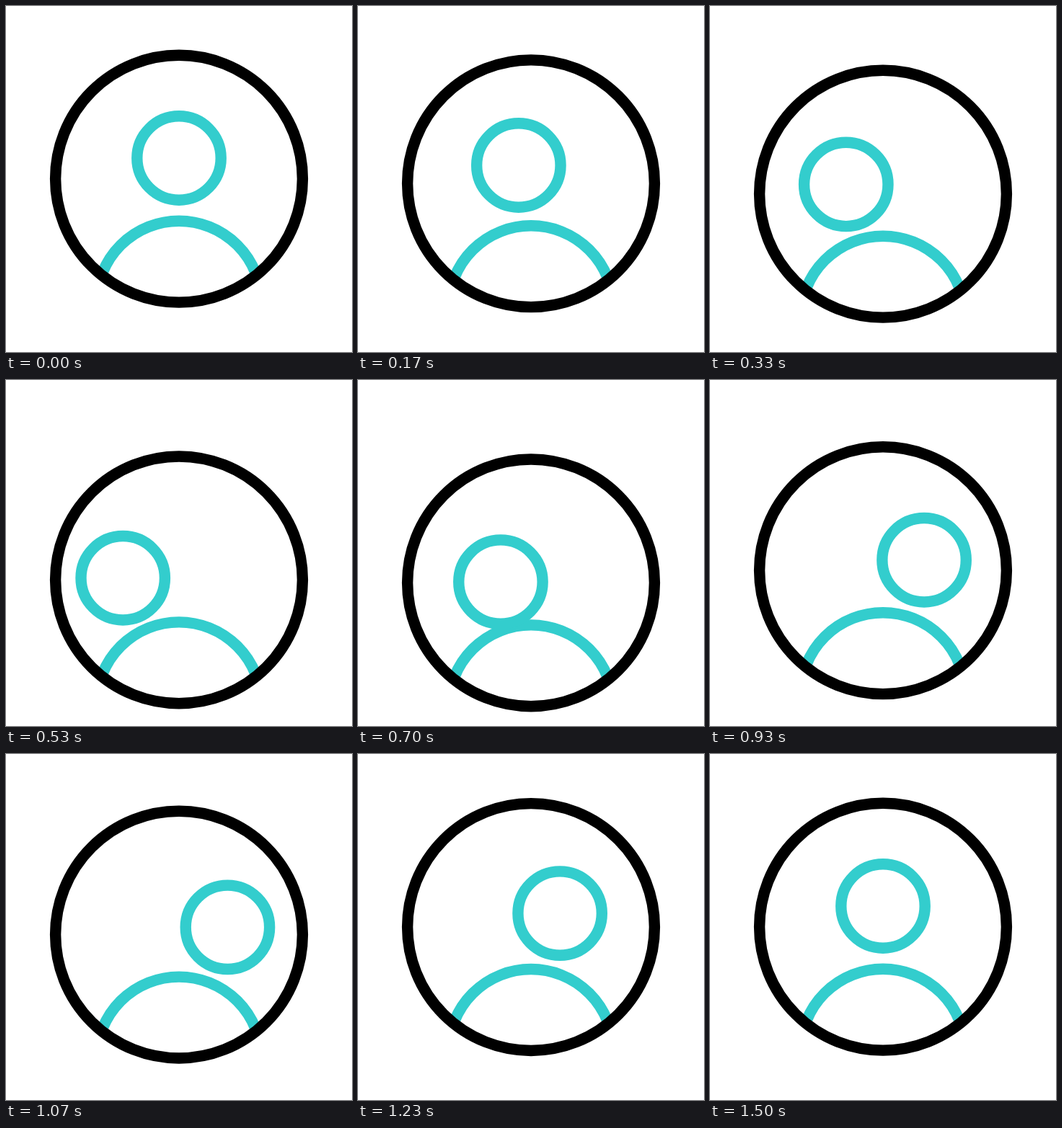
Animation, 480 px wide and 480 px high, one loop 2000 ms. Source, as an HTML page:

```html
<!DOCTYPE html>
<html lang="en">
<head>
<meta charset="utf-8">
<title>User icon</title>
<style>
  html, body { margin: 0; width: 100%; height: 100%; overflow: hidden; background: #fff; }
  svg { display: block; width: 100vw; height: 100vh; }
</style>
</head>
<body>
<svg viewBox="0 0 480 480" fill="none" stroke-width="15.4">
  <clipPath id="inside"><circle cx="240" cy="240" r="171"/></clipPath>
  <g id="badge">
    <g clip-path="url(#inside)">
      <circle cx="240" cy="412.5" r="114.3" stroke="#33cdcd"/>
    </g>
    <circle cx="240" cy="239.7" r="171.4" stroke="#000"/>
  </g>
  <circle id="head" r="58.2" stroke="#33cdcd"/>
</svg>
<script>
  const LOOP = 2000, FPS = 30, DROP = 42;
  const badge = document.getElementById('badge');
  const head = document.getElementById('head');

  // Head poses by step; bend is the vertical bulge on the way to the pose.
  const home = { step: 0, x: 240, y: 211 };
  const left = { step: 16.5, x: 162, y: 275, bend: -6.4 };
  const right = { step: 30.5, x: 309.5, y: 242, bend: 19 };
  const back = { ...home, step: 45, bend: -8.1 };
  const poses = [home, left, right, back];

  const mix = (a, b, s) => a + (b - a) * s;

  function ease(n, from, to) {
    const u = Math.min(1, Math.max(0, (n - from) / (to - from)));
    return u * u * (3 - 2 * u);
  }

  function headAt(n) {
    let i = 1;
    while (i < poses.length - 1 && n > poses[i].step) i++;
    const a = poses[i - 1], b = poses[i];
    const s = ease(n, a.step, b.step);
    return [mix(a.x, b.x, s), mix(a.y, b.y, s) + b.bend * Math.sin(Math.PI * s)];
  }

  function draw(ms) {
    const n = Math.floor((ms % LOOP + 4) * FPS / 1000) % (LOOP * FPS / 1000);
    const dy = DROP * (ease(n, 0, 20) - ease(n, 20, 38));
    badge.setAttribute('transform', `translate(0 ${dy.toFixed(2)})`);

    const [x, y] = headAt(n);
    head.setAttribute('cx', x.toFixed(2));
    head.setAttribute('cy', y.toFixed(2));
  }

  let start;
  function tick(now) {
    if (start === undefined) start = now;
    draw(Math.max(0, now - start));
    requestAnimationFrame(tick);
  }
  draw(0);
  requestAnimationFrame(tick);
</script>
</body>
</html>
```
